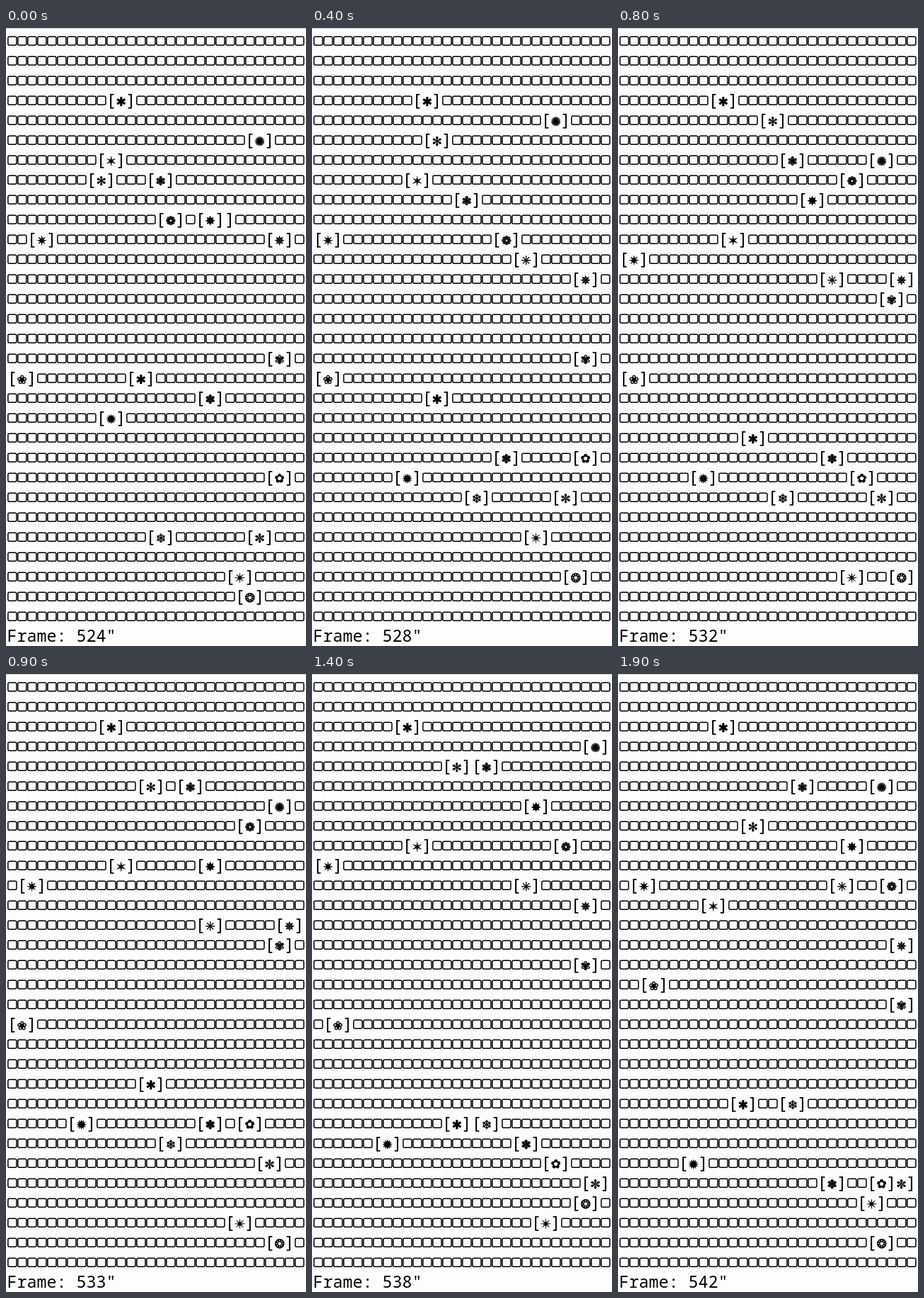
An HTML page with a canvas that plays this animation: 424 by 872 pixels, repeating every 2 s.

```html
<!DOCTYPE html>
<html lang="en">
<head>
<meta charset="utf-8">
<title>Wandering florets</title>
<style>
  html, body { margin: 0; width: 100%; height: 100%; overflow: hidden; background: #fdfdfd; }
  canvas { display: block; }
</style>
</head>
<body>
<canvas id="stage" width="424" height="872"></canvas>
<script>
const ctx = document.getElementById('stage').getContext('2d');
const SIZE = 30, CELL_W = 14, CELL_H = 28, LAST_STEP = 18;
const MONO = '500 23.33px "Noto Sans Mono", "DejaVu Sans Mono", monospace';
const SYMBOL = '17px "DejaVu Sans", sans-serif';

// Column and row of each walker at steps 0, 8 and 16; later ones overlap earlier ones.
const WALKERS = [
  ['✱', [13, 17], [13, 20], [14, 23]],
  ['✱', [11, 3], [10, 3], [10, 1]],
  ['✳', [21, 9], [21, 12], [22, 9]],
  ['✴', [23, 27], [23, 27], [24, 26]],
  ['✵', [27, 10], [28, 12], [28, 12]],
  ['✶', [10, 6], [11, 10], [9, 10]],
  ['✷', [3, 10], [1, 11], [1, 9]],
  ['✸', [20, 9], [19, 8], [24, 8]],
  ['✹', [10, 19], [8, 22], [7, 24]],
  ['✺', [25, 5], [26, 6], [27, 4]],
  ['✻', [9, 7], [15, 4], [14, 6]],
  ['✼', [25, 25], [26, 23], [27, 24]],
  ['✽', [20, 18], [21, 21], [20, 23]],
  ['✾', [27, 16], [27, 13], [28, 15]],
  ['✿', [27, 22], [24, 22], [26, 25]],
  ['❀', [1, 17], [1, 17], [2, 16]],
  ['❁', [16, 9], [23, 7], [27, 9]],
  ['❂', [24, 28], [28, 27], [27, 28]],
  ['❃', [15, 7], [17, 6], [18, 4]],
  ['❄', [15, 25], [16, 23], [17, 22]]
];

let seed = 524;
function random() {
  seed = (Math.imul(seed, 1664525) + 1013904223) >>> 0;
  return seed / 2 ** 32;
}

// One random step of at most a cell that can still reach the goal in time.
function wander(from, goal, left) {
  const low = Math.max(from - 1, goal - left + 1, 1);
  const high = Math.min(from + 1, goal + left - 1, SIZE - 2);
  const next = Math.round(from + (goal - from) / left + random() * 2 - 1);
  return Math.min(high, Math.max(low, next));
}

function makePath(stops) {
  const path = [stops[0]];
  for (let step = 0; step < LAST_STEP; step++) {
    const goal = stops[Math.floor(step / 8) + 1];
    const left = goal ? 8 - step % 8 : Infinity;
    path.push(path[step].map((from, axis) => wander(from, goal ? goal[axis] : from, left)));
  }
  return path;
}

const walkers = WALKERS.map(([symbol, ...stops]) => ({ symbol, path: makePath(stops) }));

function drawBox(x, y) {
  ctx.lineWidth = 1.5;
  ctx.beginPath();
  ctx.roundRect(x - 5.7, y - 6.25, 12.1, 12, 2);
  ctx.stroke();
}

function drawSymbol(symbol, x, y) {
  ctx.font = SYMBOL;
  ctx.lineWidth = 0.5;
  const ink = ctx.measureText(symbol);
  const base = y + (ink.actualBoundingBoxAscent - ink.actualBoundingBoxDescent) / 2;
  ctx.fillText(symbol, x, base);
  ctx.strokeText(symbol, x, base);
}

function drawCell(char, col, row) {
  const x = 8.5 + col * CELL_W, y = 18.5 + row * CELL_H;
  if (!char) {
    drawBox(x, y);
  } else if (char === '[' || char === ']') {
    ctx.font = MONO;
    ctx.fillText(char, x, y + 7.5);
  } else {
    drawSymbol(char, x, y + 1);
  }
}

function draw(step) {
  const grid = Array.from({ length: SIZE }, () => Array(SIZE).fill(''));
  for (const { symbol, path } of walkers) {
    const [col, row] = path[step];
    grid[row].splice(col - 1, 3, '[', symbol, ']');
  }

  ctx.fillStyle = '#fdfdfd';
  ctx.fillRect(0, 0, 424, 872);
  ctx.fillStyle = '#d0d0d0';
  ctx.fillRect(0, 0, 424, 1);

  ctx.fillStyle = ctx.strokeStyle = '#000';
  ctx.textAlign = 'center';
  grid.forEach((cells, row) => cells.forEach((char, col) => drawCell(char, col, row)));

  ctx.font = MONO;
  ctx.textAlign = 'left';
  ctx.fillText(`Frame: ${524 + step}"`, 1.5, 866);
}

function tick() {
  const beat = Math.floor(performance.now() % 2000 / 100);
  draw(beat < 17 ? beat : beat - 1); // the 17th beat holds
  requestAnimationFrame(tick);
}
tick();
</script>
</body>
</html>
```
